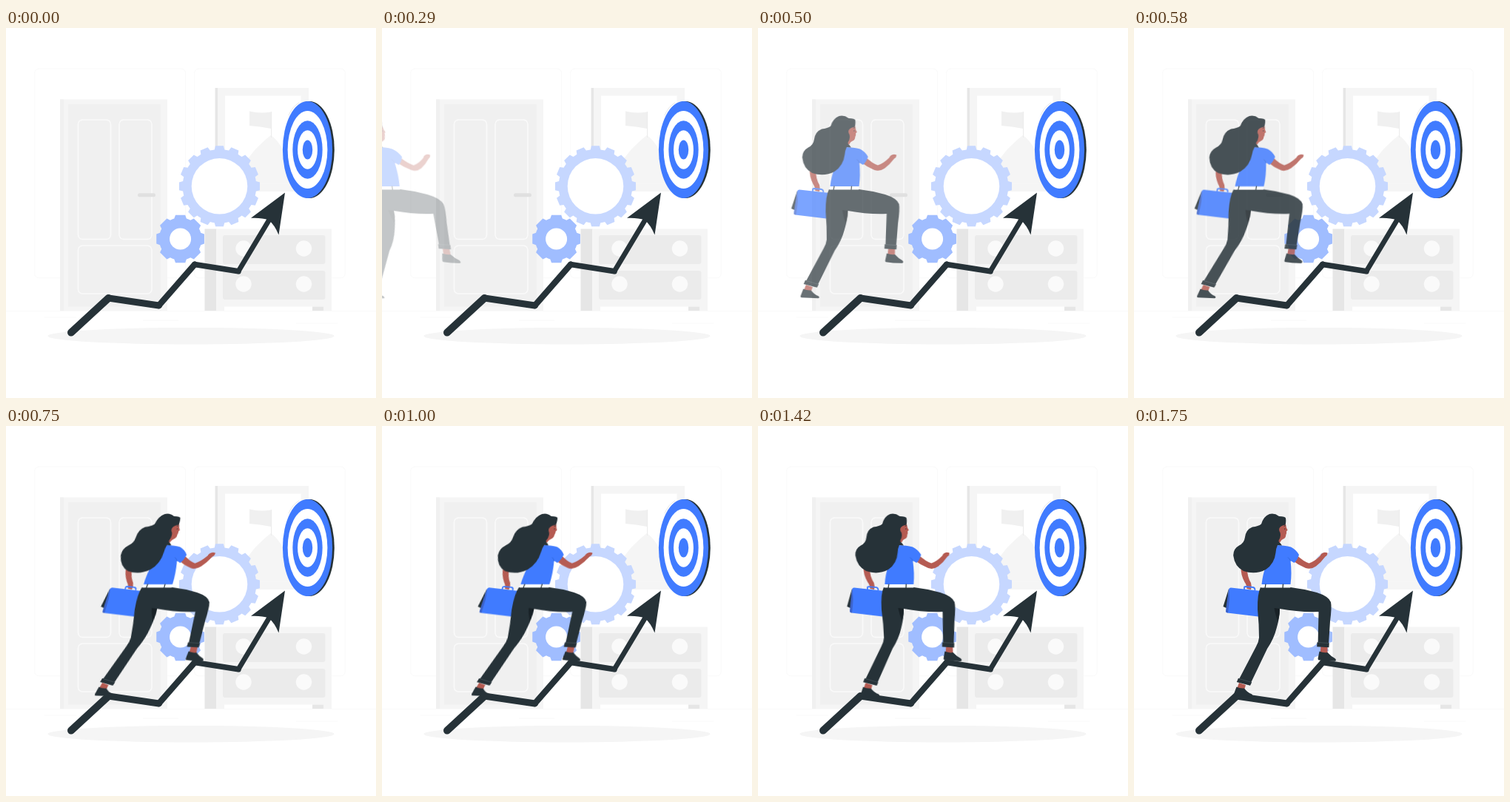
An HTML page for the animation above (1.79 s loop, 500 by 500 pixels).

```html
<!DOCTYPE html>
<html lang="en">
<head>
<meta charset="utf-8">
<title>Climbing to the goal</title>
<style>
  html, body { margin: 0; width: 100%; height: 100%; overflow: hidden; background: #fff; }
  svg { display: block; width: 100%; height: 100%; }
  #climber { transform-origin: 0 250px; opacity: 0; }
  .blue { fill: #407bff; }
  .dark { fill: #263238; }
  .skin { fill: #b55b52; }
  .hairline { fill: none; stroke: #ebebeb; stroke-width: .3; }
  .panel { fill: none; stroke: #fafafa; stroke-width: 1.5; }
</style>
</head>
<body>
<svg viewBox="0 0 500 500">
  <!-- room -->
  <g class="hairline">
    <rect x="38.7" y="55.1" width="203.9" height="282.6" rx="5.6"/>
    <rect x="254.7" y="55.1" width="203.6" height="282.6" rx="5.6"/>
    <path d="M0 382.5H500M185 395.2H233M392 399H448M52 391H95"/>
  </g>

  <!-- door -->
  <path fill="#f5f5f5" d="M73 96.5H218V382H73Z"/>
  <path fill="#f0f0f0" d="M73 96.5H78V382H73ZM84 103H209V376.500H84Z"/>
  <g class="panel">
    <rect x="97.500" y="124" width="44" height="161.500" rx="6"/>
    <rect x="153" y="124" width="44" height="161.500" rx="6"/>
    <rect x="97.500" y="294" width="99.500" height="65" rx="6"/>
  </g>
  <rect x="178" y="223.300" width="24" height="5" rx="2.500" fill="#e0e0e0"/>

  <!-- picture -->
  <path fill="#f5f5f5" d="M285 81H409V221H285Z"/>
  <path fill="#e6e6e6" d="M282.500 81H286V221H282.500Z"/>
  <path fill="#fff" d="M296 91.500H398.500V210.500H296Z"/>
  <path fill="#f5f5f5" d="M301 210.500L336 165Q352 149 358 145Q366 150 374 164Q386 184 398.500 190V210.500Z"/>
  <path fill="#f0f0f0" d="M329 112.500Q343 116 358 113.500V136Q343 133 329 132Z"/>
  <path fill="none" stroke="#ebebeb" d="M358.500 113V148"/>

  <!-- dresser -->
  <path fill="#e6e6e6" d="M268.500 271.500H284.500V382H268.500Z"/>
  <path fill="#f5f5f5" d="M284 271.500H440V382H429V376.500H295V382H284Z"/>
  <path fill="#e6e6e6" d="M414 376.500H429V382H414Z"/>
  <g fill="#ebebeb">
    <rect x="293" y="280" width="138.500" height="39" rx="3"/>
    <rect x="293" y="328" width="138.500" height="39" rx="3"/>
  </g>
  <g fill="#fafafa">
    <circle cx="321" cy="298" r="10.700"/><circle cx="402.500" cy="298" r="10.700"/>
    <circle cx="321" cy="346" r="10.700"/><circle cx="402.500" cy="346" r="10.700"/>
  </g>

  <ellipse cx="250" cy="416.200" rx="193.700" ry="11.300" fill="#f5f5f5"/>

  <path id="bigGear" fill="#c6d7ff"/>
  <circle cx="288.500" cy="213.800" r="37.800" fill="#fff"/>
  <path id="smallGear" fill="#a0bdff"/>
  <circle cx="235.600" cy="285" r="14.500" fill="#fff"/>

  <!-- target -->
  <path fill="none" stroke="#e0e0e0" stroke-width=".8" d="M382 118Q387 106 396 101"/>
  <ellipse class="dark" cx="410" cy="164.500" rx="33.800" ry="65.500"/>
  <g id="rings"></g>

  <!-- rising arrow -->
  <g id="trend" stroke="#263238" stroke-linecap="round"></g>
  <path class="dark" d="M377 222.500L331 256.800Q345 256 355 259.500Q363 266 368.500 279.500Z"/>

  <g id="climber">
    <!-- far arm and briefcase -->
    <path class="skin" d="M144.500 190L153 193Q153 204 158 212Q159.500 217 158 221L152.500 220Q152 214 149.500 211Q144 201 144.500 190Z"/>
    <path class="dark" d="M128 220L120.500 244L126 246.500Z"/>
    <path fill="none" stroke="#407bff" stroke-width="1.800" d="M149 221V218.500Q149 217 151 217L161 218Q163.500 218.500 163.500 222"/>
    <path class="blue" d="M131 218.500L172 223V258L126 252.500Q123.800 252 124 250L128 221Q128.500 218.300 131 218.500Z"/>
    <path fill="#336" opacity=".35" d="M128.800 219.500L124 250.500Q124 252.300 127 252.600L129 235Z"/>

    <!-- shoes and ankles -->
    <path class="skin" d="M142 347L151 350L148.500 358L139 355ZM252.500 297H261.500V309H251.500Z"/>
    <path class="dark" d="M138.500 352.500Q143 355 149 354.500Q153 360 159 362.300Q161.500 364.500 159 365.200L136 364.200Q134.500 364 135 362Z"/>
    <path class="dark" d="M250.500 304.500Q256 307 261.500 306Q266 311 271.500 314Q274 316.300 272 317.800Q260 318 249.500 316.200Q248.400 316 248.600 314Z"/>

    <!-- trousers -->
    <path class="dark" d="M171 218H211.500Q229 220 247 225Q263 230 266 238Q267.500 245 265 264L262.800 298H248.500L249.500 251Q224 252 197 247Q197 258 193 272Q189 288 180 301L157.500 348L142 342L165 298Q168.500 292 169 286Q169 268 167 248Q166.500 227 171 218Z"/>
    <path fill="#182126" d="M189.500 246L197 247Q197 255 194.500 264Q191.500 257 189.500 246Z"/>
    <path class="dark" d="M141 340.800L159.200 346.300L157 350.800L138.800 346ZM247.500 292.300L263.800 293.300L263.400 299.300L247.200 298.300Z"/>
    <path fill="none" stroke="#59666c" stroke-width=".5" d="M141.500 341.300L159 346.500M248 292.500L263.500 293.500"/>

    <!-- near arm -->
    <path class="skin" d="M220 174.500Q229 183 236.500 185.500Q244 183 251.500 175.500Q253.500 171 258 170.700L261.200 171.200Q262 174.500 258.500 176.500Q253 184 246 189.500Q239 194.500 232 192Q222 188 214 181.500Z"/>

    <!-- waistband and shirt -->
    <path fill="#fff" d="M172.500 213H211.300V218.500H171.500Z"/>
    <path class="blue" d="M186 161Q203 160.500 212 163.500Q219 167 223 174Q221 181 216.500 185L211.500 182Q213.500 199 211.500 214H172.500Q174 200 178 190Z"/>
    <path fill="none" stroke="#2c5fd0" stroke-width=".7" d="M211.500 182.500Q211 180 208 177.500"/>
    <path fill="none" stroke="#263238" stroke-width="1.300" d="M178 213.500L177 219.500M201.500 213.500L201 219.500"/>

    <!-- head -->
    <path class="skin" d="M194 134L204.800 131.500Q205.600 135 206 137.500L207.600 140.800L206 142.200Q206.500 145 205.300 147Q205.200 151.500 201.500 152.800Q199 153.500 197.500 157L188 162Z"/>
    <path fill="none" stroke="#263238" stroke-width=".9" d="M202.600 135.200L205 134.600M203.800 138.300V139.800"/>
    <path class="dark" d="M205 124.500Q204.500 122 196 122Q190 117.300 183 119Q175 122 172 132.500Q168 135.500 160 136.500Q151 140 149.800 151Q149 158 142 161.500Q134 166 134.200 175Q136 190 148 196Q164 201.500 178 194Q190 186 191.500 171Q192 165 194 161L200 161.500L197.500 158Q195.500 157.500 195.500 155Q199 150 197.500 144Q195.300 141 196.500 138Q198 134.500 204.500 133.500Q205.800 129 205 124.500Z"/>
  </g>
</svg>
<script>
  const $ = id => document.getElementById(id);

  function add(parent, tag, attrs) {
    const el = document.createElementNS("http://www.w3.org/2000/svg", tag);
    for (const key in attrs) el.setAttribute(key, attrs[key]);
    parent.append(el);
  }

  // Toothed outline; top and base are half the tooth width in px.
  function gear(id, cx, cy, outer, root, teeth, top, base) {
    const pts = [];
    for (let i = 0; i < teeth; i++) {
      const mid = i / teeth * 2 * Math.PI;
      const at = (r, w) => {
        const a = mid + w / r;
        pts.push((cx + r * Math.sin(a)).toFixed(2) + " " + (cy - r * Math.cos(a)).toFixed(2));
      };
      at(root, -base); at(outer, -top); at(outer, top); at(root, base);
      at(root, root * Math.PI / teeth);
    }
    $(id).setAttribute("d", "M" + pts.join("L") + "Z");
  }
  gear("bigGear", 288.5, 213.8, 54.8, 49.8, 16, 5.4, 6.8);
  gear("smallGear", 235.6, 285, 33, 28.8, 8, 6.6, 8.4);

  for (let n = 5; n > 0; n--) {
    add($("rings"), "ellipse", {
      cx: 407.5, cy: 164.5, rx: 6.72 * n, ry: 13.1 * n, fill: n % 2 ? "#407bff" : "#fff"
    });
  }

  // The line gets thinner on its way up.
  const bends = [[88, 411.5], [138.5, 365], [206.5, 375], [255, 319.5], [314, 328.8], [357, 257]];
  [10, 9, 8.2, 7.5, 6.8].forEach((width, i) => {
    const [x1, y1] = bends[i], [x2, y2] = bends[i + 1];
    add($("trend"), "line", { x1, y1, x2, y2, "stroke-width": width });
  });

  // Light-speed entrance, shown at 24 pictures a second.
  const frames = 43, end = (frames - 1) / frames;
  const easing = "cubic-bezier(.36, -.01, .5, 1.38)";
  const pose = (at, x, skew, opacity) =>
    ({ offset: at * end, transform: `translateX(${x}px) skewX(${skew}deg)`, opacity, easing });
  $("climber").animate([
    pose(0, -250, 20, 0),
    pose(.6, 0, -10, 1),
    pose(.8, 0, 2, 1),
    pose(1, 0, 0, 1),
    { offset: 1, transform: "translateX(0px) skewX(0deg)", opacity: 1 }
  ], { duration: 1790, delay: -4, iterations: Infinity, easing: `steps(${frames}, end)` });
</script>
</body>
</html>
```
